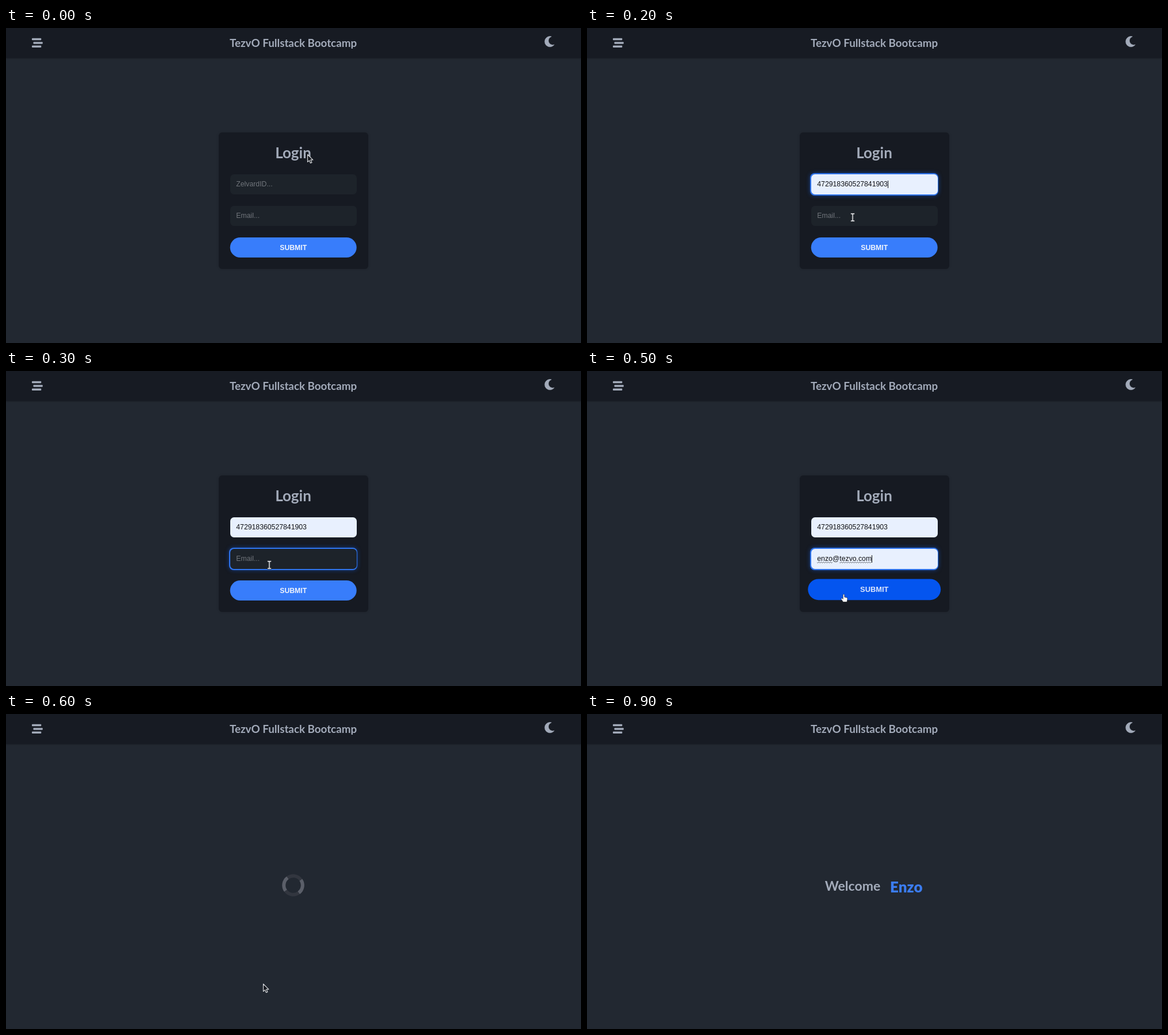
Recreate the animation shown at these times as an HTML page with a canvas. Size 1000x549 px, loop 1.1 s.

```html
<!DOCTYPE html>
<html lang="en">
<head>
<meta charset="utf-8">
<title>Login</title>
<style>
html, body { margin: 0; width: 100%; height: 100%; overflow: hidden; background: #222831; }
canvas { display: block; }
</style>
</head>
<body>
<canvas id="stage" width="1000" height="549"></canvas>
<script>
const ctx = document.getElementById('stage').getContext('2d');
const LOOP = 1100;
const GREY = '#a3abba', BLUE = '#387dfb';
const BRAND = 'Nunito, Lato, sans-serif';
const FORM = '"Liberation Sans", Arial, sans-serif';
const USER_ID = '472918360527841903', EMAIL = 'enzo@tezvo.com';

// Each step holds until the next one starts.
const steps = [
  { at: 0, cursor: [arrow, 524, 220] },
  { at: 100, focus: 'id', cursor: [beam, 470, 278] },
  { at: 200, id: USER_ID, focus: 'id', cursor: [beam, 462, 330] },
  { at: 300, id: USER_ID, focus: 'email', cursor: [beam, 458, 338] },
  { at: 400, id: USER_ID, focus: 'email', cursor: [beam, 454, 346] },
  { at: 500, id: USER_ID, email: EMAIL, focus: 'email', hover: true, cursor: [hand, 447, 389] },
  { at: 600, page: 'loading', turn: -36, cursor: [arrow, 447, 470] },
  { at: 700, page: 'loading', turn: 0, cursor: [arrow, 447, 477] },
  { at: 900, page: 'welcome' }
];

function box(x, y, w, h, r, fill) {
  ctx.beginPath();
  ctx.roundRect(x, y, w, h, r);
  ctx.fillStyle = fill;
  ctx.fill();
}

function text(str, x, y, font, fill, align = 'left') {
  ctx.font = font;
  ctx.fillStyle = fill;
  ctx.textAlign = align;
  ctx.fillText(str, x, y);
}

function shape(d, x, y, fill, stroke, width = 1) {
  const path = new Path2D(d);
  ctx.save();
  ctx.translate(x, y);
  ctx.lineJoin = 'round';
  ctx.lineWidth = width;
  ctx.strokeStyle = stroke;
  ctx.fillStyle = fill;
  ctx.fill(path);
  ctx.stroke(path);
  ctx.restore();
}

function arrow(x, y) {
  shape('M.5 .5V13.5L3.5 10.9 5.5 15.4 7.9 14.4 5.9 9.9H9.8Z', x, y, '#15181e', '#d5d7da', 1.2);
}

function beam(x, y) {
  shape('M-3.5-7.5H3.5V-5H1.2V5H3.5V7.5H-3.5V5H-1.2V-5H-3.5Z', x, y, '#d8dadd', '#22262c', .8);
}

function hand(x, y) {
  shape('M-1.8 1Q-.5-.8 .8 1V5L5 6Q6.4 6.5 6 8.5L5 13.5H-1.5L-5 8.5Q-5-7-3.5 7L-1.8 8.5Z'.replace('Q-5-7-3.5 7', 'Q-5 6.6-3.5 7'),
    x, y, '#fff', '#22262c', .7);
}

function header() {
  ctx.save();
  ctx.shadowColor = 'rgba(0,0,0,.2)';
  ctx.shadowBlur = 3;
  box(0, 0, 1000, 52.5, 0, '#171b23');
  ctx.restore();
  [[45, 17.8], [47.5, 24.2], [45, 30.6]].forEach(([x, y]) => box(x, y, 16.3, 3.5, 1, GREY));
  text('TezvO Fullstack Bootcamp', 499.5, 32.5, `700 18.8px ${BRAND}`, GREY, 'center');
  shape('M948.4 14.9A9.1 9.1 0 1 0 953.3 29.2A7.4 7.4 0 0 1 948.4 14.9Z', 0, 0, GREY, GREY, .8);
}

function squiggle(x, y, w) {
  ctx.beginPath();
  for (let i = 0; i <= w; i += .5) ctx.lineTo(x + i, y + .8 * Math.sin(i * Math.PI / 2));
  ctx.strokeStyle = '#33363c';
  ctx.lineWidth = .8;
  ctx.stroke();
}

function field(y, hint, value, focused) {
  if (focused) {
    ctx.save();
    ctx.shadowColor = 'rgba(20,90,220,.55)';
    ctx.shadowBlur = 7;
    box(388, y - 2, 223, 39, 8, '#2f75ef');
    ctx.restore();
  }
  box(390, y, 220, 35, 6.5, value ? '#e8f0fe' : '#1d232a');
  const font = `12.25px ${FORM}`;
  text(value || hint, 400.3, y + 21.3, font, value ? '#101114' : '#70757b');
  const width = s => ctx.measureText(s).width;
  if (value === EMAIL) {
    const at = EMAIL.indexOf('@');
    const start = width(EMAIL.slice(0, at + 1));
    squiggle(400.3, y + 23.7, width(EMAIL.slice(0, at)));
    squiggle(400.3 + start, y + 23.7, width(EMAIL) - start);
  }
  if (focused && (value || hint[0] !== 'E')) {
    ctx.fillStyle = value ? '#101114' : '#c9ccd2';
    ctx.fillRect(Math.round(400.3 + width(value || '')), y + 11, 1, 13);
  }
}

function login(s) {
  ctx.save();
  ctx.shadowColor = 'rgba(0,0,0,.15)';
  ctx.shadowBlur = 4;
  box(370, 182, 260, 238, 6, '#161a22');
  ctx.restore();
  text('Login', 499.5, 227.3, `700 26px ${BRAND}`, GREY, 'center');
  field(255, 'ZelvardID...', s.id, s.focus === 'id');
  field(310, 'Email...', s.email, s.focus === 'email');
  ctx.save();
  ctx.translate(499.7, s.hover ? 380.8 : 382.5);
  if (s.hover) ctx.scale(1.05, 1.05);
  box(-110, -17.5, 220, 35, 17.5, s.hover ? '#0455ef' : BLUE);
  text('SUBMIT', 0, 4, `700 12.25px ${FORM}`, s.hover ? '#dce6fb' : '#f0f4fc', 'center');
  ctx.restore();
}

function spinner(turn) {
  ctx.lineWidth = 6;
  for (let i = 0; i < 4; i++) {
    const from = (turn / 90 + i) * Math.PI / 2;
    ctx.beginPath();
    ctx.arc(499.5, 298.5, 16.3, from, from + Math.PI / 2);
    ctx.strokeStyle = i % 2 ? '#32363f' : '#5b5f69';
    ctx.stroke();
  }
}

function welcome() {
  text('Welcome', 413.8, 308.3, `700 23px ${BRAND}`, GREY);
  text('Enzo', 527, 310.8, `900 26px ${BRAND}`, '#3b7cf0');
}

function draw(now) {
  const t = now % LOOP;
  const s = steps.findLast(step => step.at <= t);
  ctx.fillStyle = '#222831';
  ctx.fillRect(0, 0, 1000, 549);
  header();
  if (s.page === 'loading') spinner(s.turn);
  else if (s.page === 'welcome') welcome();
  else login(s);
  if (s.cursor) {
    const [pointer, x, y] = s.cursor;
    pointer(x, y);
  }
}

const start = performance.now();
function tick() {
  draw(performance.now() - start);
  requestAnimationFrame(tick);
}
tick();
</script>
</body>
</html>
```
